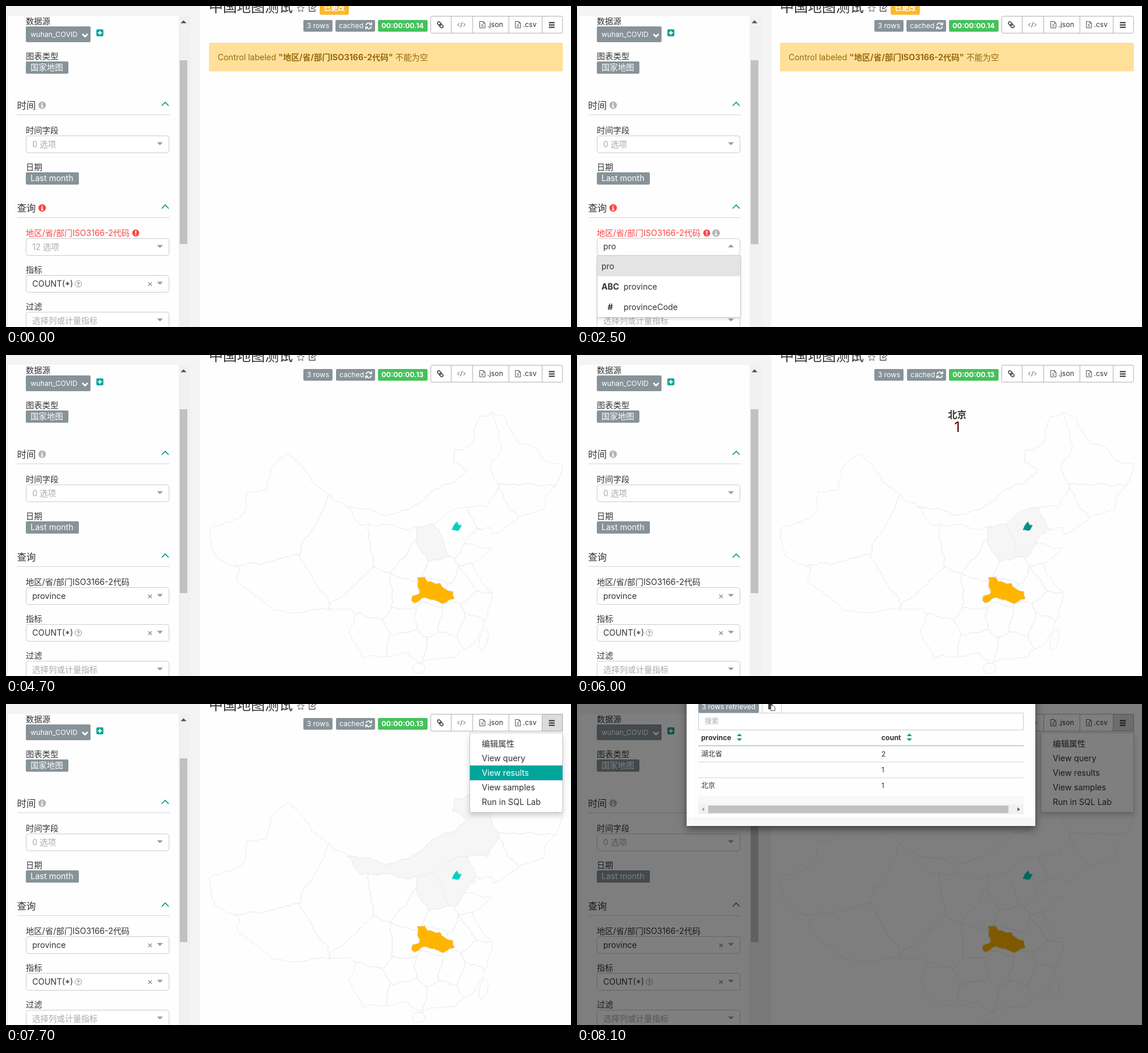
An HTML page for the animation above (8900 ms loop, 969 by 550 pixels).

```html
<!DOCTYPE html>
<html lang="zh-CN">
<head>
<meta charset="utf-8">
<title>中国地图测试</title>
<style>
html, body { margin: 0; width: 100%; height: 100%; overflow: hidden; background: #fefefe; }
svg { display: block; width: 969px; height: 550px; }
text { font: 14px Inter, "Noto Sans CJK SC", "Noto Sans CJK", sans-serif; fill: #333; white-space: pre; }
.s { font-size: 12px; }
.h { font-size: 16px; }
.xl { font-size: 24px; }
.b { font-weight: 700; }
.m { text-anchor: middle; }
.w { fill: #fff; }
.ph { fill: #aaa; }
.red { fill: #fb4545; }
.box { fill: #fff; stroke: #ccc; }
.line { fill: none; stroke: #cfd8e4; }
.ico { fill: none; stroke: #555; }
.land { fill: none; stroke: #e8ecec; stroke-linejoin: round; }
.hover { fill: #f6f6f6; }
.drop { filter: drop-shadow(0 2px 2px rgba(0,0,0,.14)); }
.menu { filter: drop-shadow(0 5px 5px rgba(0,0,0,.18)); }
#dialog { filter: drop-shadow(0 5px 7px rgba(0,0,0,.5)); }
</style>
</head>
<body>
<svg viewBox="0 0 969 550">
  <defs>
    <path id="down" d="M-5-2.5h10L0 2.5z"/>
    <path id="up" d="M-5 2.5h10L0-2.5z"/>
    <path id="fold" d="M-6 3.5 0-2.5 6 3.5" fill="none" stroke="#00968b" stroke-width="1.6"/>
    <path id="cross" d="M-3-3 3 3M3-3-3 3" stroke="#888" stroke-width="1.2"/>
    <g id="info"><circle r="6.5"/><path d="M0-4.2V-2.2M-1.8-.4H0V3.4M-2 3.4H2" stroke="#fff" stroke-width="1.7" fill="none"/></g>
    <g id="warn"><circle r="6"/><path d="M0-4V1M0 2.2V4" stroke="#fff" stroke-width="2"/></g>
    <path id="sort" d="M-4.5-2h9L0-6.5zM-4.5 2h9L0 6.5z" fill="#00a08f"/>
    <path id="file" class="ico" d="M-4.5-5.5H1.5L4.5-2.5V5.5H-4.5zM1.5-5.5V-2.5H4.5M-2 0H2M-2 2.5H2"/>
    <clipPath id="coast"></clipPath>
  </defs>

  <rect width="333" height="550" fill="#f5f4f5"/>
  <rect x="4" y="17" width="312" height="533" fill="#fefefe"/>
  <rect x="296" y="17" width="20" height="533" fill="#f1f1f1"/>
  <rect x="298" y="93" width="13" height="315" fill="#c1c1c1"/>
  <use href="#up" x="304.5" y="27" fill="#505050"/>
  <g id="panel"></g>

  <g id="header"></g>
  <path class="ico" d="M505.500-2l1.800 3.900 4.200.5-3.100 2.900.8 4.200-3.700-2.100-3.700 2.100.8-4.200-3.100-2.900 4.200-.5z"/>
  <path class="ico" d="M527-1H520V9H530V5M524 5l.5-3L531-3.500l2.500 2L527 4.500z" stroke-width="1.3"/>
  <path d="M617.500 33a4.400 4.400 0 0 1 8-2M626.500 35a4.400 4.400 0 0 1-8 2M627 28v4h-4M617 40v-4h4" fill="none" stroke="#fff" stroke-width="1.7"/>
  <g transform="rotate(40 745 32)" class="ico" stroke-width="1.7"><rect x="739" y="29.5" width="7" height="4.5" rx="2.2"/><rect x="744" y="30.5" width="7" height="4.5" rx="2.2"/></g>
  <path class="ico" d="M777.500 29l-3 3 3 3M784.500 29l3 3-3 3M782.500 27.500l-3 9"/>
  <path d="M931 28.500h10M931 32.500h10M931 36.500h10" stroke="#333" stroke-width="2"/>

  <g id="chart"></g>
  <g id="actions" data-on="7000-8900"></g>
  <rect id="shade" width="969" height="550"/>
  <g id="dialog" data-on="7800-8900">
    <rect id="sheet" x="188" y="-40" width="598" rx="1" fill="#fefefe"/>
    <g id="results" data-on="8100-8900"></g>
  </g>
</svg>
<script>
const $ = id => document.getElementById(id);

// Markup helpers; y is the vertical centre of a text line.
const SIZE = { s: 12, h: 16, xl: 24 };
const baseline = (y, cls) => y + .36 * (SIZE[cls.split(' ')[0]] || 14);
const text = (x, y, s, cls = '', attr = '') => `<text x="${x}" y="${baseline(y, cls)}" class="${cls}" ${attr}>${s}</text>`;
const rect = (x, y, w, h, attr) => `<rect x="${x}" y="${y}" width="${w}" height="${h}" ${attr}/>`;
const box = (x, y, w, h, attr = '') => rect(x + .5, y + .5, w - 1, h - 1, 'class="box" ' + attr);
const use = (id, x, y, attr = '') => `<use href="#${id}" x="${x}" y="${y}" ${attr}/>`;
const line = (x1, x2, y, attr = 'class="line"') => `<path d="M${x1} ${y}H${x2}" ${attr}/>`;
const on = (spans, ...parts) => `<g data-on="${spans}">${parts.join('')}</g>`;
const badge = (x, y, w, h, s, cls = '', fill = '#879399') =>
  rect(x, y, w, h, `rx="2" fill="${fill}"`) + text(x + (cls ? 6 : 8), y + h / 2 - (cls ? 0 : 1), s, cls + ' w');
const select = y => box(34, y, 246, 30, 'rx="4"');
const arrow = (y, id = 'down') => use(id, 264, y, 'fill="#999"');
const grey = 'fill="#b3b3b3"', alarm = 'fill="#fb4545"';
const section = (s, y) => text(19, y, s, 'h') + use('fold', 273, y - 2.5) + line(19, 281, y + 16.5);
const caret = x => `<path d="M${x}.5 402V419" stroke="#222"/>`;

function panel() {
  const code = '地区/省/部门ISO3166-2代码';
  const labels = [['时间字段', 213], ['日期', 276], ['指标', 452], ['过滤', 515], ['数据源', 26], ['图表类型', 86]];
  return labels.map(([s, y]) => text(34, y, s)).join('') +
    rect(34, 35, 111, 27, 'rx="2" fill="#879399"') + text(42, 48.500, 'wuhan_COVID', 's w', 'font-weight="500"') +
    '<path d="M131 48l4.500 4.500 4.500-4.500" fill="none" stroke="#fff" stroke-width="2.6"/>' +
    rect(155, 40, 12, 12, 'rx="2" fill="#00a699"') + '<path d="M157.500 46h7M161 42.500v7" stroke="#fff" stroke-width="2"/>' +
    badge(34, 95, 73, 21, '国家地图') + badge(34, 285, 91, 21, 'Last month') +
    section('时间', 170) + use('info', 62, 170, grey) +
    section('查询', 346) + on('0-3200', use('info', 62, 346, alarm)) +
    select(222) + text(45, 237, '0 选项', 'ph') + arrow(236) +
    on('0-3200', text(34, 389, code, 'red'), use('warn', 222.500, 389, alarm)) +
    on('400-3200', use('info', 238.500, 389, grey)) +
    on('3200-8900', text(34, 389, code)) +
    select(398) +
    on('3200-3900', rect(34.500, 398.500, 245, 29, 'rx="4" fill="none" stroke="#000" stroke-opacity=".1" stroke-width="6"'),
      rect(34.500, 398.500, 245, 29, 'rx="4" fill="#fff" stroke="#111"')) +
    on('0-1800', text(45, 413, '12 选项', 'ph')) +
    on('0-900 3200-8900', arrow(412)) + on('900-3200', arrow(411, 'up')) +
    '<text id="query" x="45" y="416.500"></text>' +
    on('900-1400', caret(45)) + on('2000-2500 3000-3200', caret(67)) +
    on('3200-8900', text(45, 413, 'province'), use('cross', 247, 413.500)) +
    on('300-400', use('info', 71, 452, grey)) +
    select(461) + text(45, 476, 'COUNT(*)') + use('cross', 247, 476.500) + arrow(475) +
    '<circle cx="124" cy="476" r="5.5" fill="none" stroke="#999"/>' +
    text(124, 475, '?', 'm b', 'style="font-size:9px;fill:#888"') +
    select(524) + text(45, 539, '选择列或计量指标', 'ph') + arrow(538) +
    '<g id="list" class="drop" data-on="900-3200"></g>';
}

function header() {
  const time = s => badge(638, 24, 85, 20, s, 's b', '#44c25b');
  return text(348, 1.500, '中国地图测试', 'xl') +
    on('0-3200', rect(538, -7, 50, 22, 'rx="3" fill="#fcb72c"'), text(545, 3.500, '已更改', 's b w')) +
    badge(510, 24, 50, 20, '3 rows', 's') +
    on('0-4000', badge(565, 24, 68, 20, 'cached', 's'), time('00:00:00.14')) +
    on('4000-8900', badge(566, 24, 67, 20, 'cached', 's'), time('00:00:00.13')) +
    box(728, 17, 227, 30, 'rx="2" style="stroke:#b3b3b3"') +
    on('6900-8900', rect(919.500, 17.500, 35, 29, 'fill="#dcdcdc" stroke="#a5a5a5"')) +
    '<path d="M763.500 17v30M800.500 17v30M862.500 17v30M919.500 17v30" stroke="#b3b3b3"/>' +
    use('file', 817, 32) + text(825.500, 32, '.json', 's') + use('file', 878, 32) + text(886.500, 32, '.csv', 's');
}

// The outer border starts where the northern steppe begins.
const pairs = s => s.split(', ').map(p => p.split(' ').map(Number));
const land = pairs('585 261, 650 275, 690 265, 722 240, 750 222, 775 212, 790 196, 766 184, 770 163, 790 158, 803 145, 806 122, 813 105, 835 98, ' +
  '855 105, 880 152, 905 158, 925 182, 954 187, 948 215, 922 248, 922 265, 888 274, 868 287, 836 308, 832 296, 797 306, 785 325, 833 331, 800 360, ' +
  '832 405, 828 435, 810 480, 775 515, 712 530, 690 510, 612 520, 587 476, 600 446, 590 433, 545 435, 500 441, 455 434, 398 390, 400 364, 358 345, ' +
  '348 300, 407 272, 412 234, 446 232, 455 193, 484 169, 521 207, 548 235');
const steppe = [...land.slice(0, 14), ...pairs('850 155, 830 195, 845 225, 825 262, 775 262, 735 291, 690 300, 655 290, 610 292')];
const hubei = pairs('705 381, 719 380, 723 388, 745 391, 767 405, 769 418, 749 427, 717 416, 700 426, 695 421, 697 412, 709 408, 706 398');
const beijing = pairs('774 285, 777 291, 782 291, 777 301, 764 300, 769 290');
const seeds = pairs('734 328, 770 316, 450 285, 470 410, 580 345, 640 415, 672 330, 698 350, 745 372, 735 405, 682 415, 682 452, 625 485, ' +
  '690 495, 725 450, 750 503, 765 455, 797 465, 812 432, 782 395, 805 378, 800 338, 845 275, 885 250, 890 190');

const noise = (x, y) => { const v = Math.sin(x * 12.99 + y * 78.23) * 43758.5; return v - Math.floor(v) - .5; };
function rough(a, b) {
  const len = Math.hypot(b[0] - a[0], b[1] - a[1]);
  if (len < 5) return [b];
  const sx = a[0] + b[0], sy = a[1] + b[1], sway = Math.min(len, 24) * .3;
  const mid = [sx / 2 + noise(sx, sy) * sway, sy / 2 + noise(sy, sx) * sway];
  return [...rough(a, mid), ...rough(mid, b)];
}
const next = (pts, i) => pts[(i + 1) % pts.length];
const outline = pts => 'M' + pts.flatMap((p, i) => rough(p, next(pts, i)))
  .map(p => p.map(v => v.toFixed(1)).join(' ')).join('L') + 'Z';

// Province borders: the area nearest to each seed.
const dist = (p, q) => (p[0] - q[0]) ** 2 + (p[1] - q[1]) ** 2;
const clip = (pts, side) => pts.flatMap((p, i) => {
  const q = next(pts, i), a = side(p), b = side(q), k = a / (a - b);
  return [...(a >= 0 ? [p] : []), ...(a * b < 0 ? [p.map((v, n) => v + (q[n] - v) * k)] : [])];
});
const stage = [[300, 50], [969, 50], [969, 560], [300, 560]];
const cell = s => seeds.filter(o => o !== s)
  .reduce((pts, o) => clip(pts, p => dist(p, o) - dist(p, s)), stage).map(p => p.map(Math.round));

const shape = (pts, attr = '') => `<path d="${outline(pts)}" ${attr}/>`;
const fill = c => `style="fill:${c}"`;
function map() {
  const cells = seeds.map(cell), [shanxi, hebei] = cells;
  $('coast').innerHTML = shape(land);
  return '<g class="land"><g clip-path="url(#coast)">' + cells.map(c => shape(c)).join('') +
    on('4600-7800', shape(shanxi, 'class="hover"')) + on('5500-7800', shape(hebei, 'class="hover"')) + '</g>' +
    shape(land) + shape(steppe, fill('#fefefe')) + on('6500-7800', shape(steppe, 'class="hover"')) +
    '<ellipse cx="708" cy="537" rx="11" ry="9"/><ellipse cx="819" cy="488" rx="7" ry="18" transform="rotate(14 819 488)"/>' +
    shape(hubei, fill('#ffb400')) + on('4900-5300', shape(hubei, fill('#b37e00'))) +
    shape(beijing, fill('#00d1c1')) + on('5600-5700 6000-6400', shape(beijing, fill('#009287'))) + '</g>';
}

function chart() {
  const tip = (spans, name, n) => on(spans, text(652, 102, name, 'h b m'), text(652, 123.500, n, 'xl m', fill('#400')));
  const button = c => rect(611, 307, 70, 30, `rx="2" fill="${c}"`);
  return on('0-3200', rect(348, 63, 607, 49, 'rx="2" fill="#ffe09a"'),
      text(363, 88, 'Control labeled <tspan class="b">"地区/省/部门ISO3166-2代码"</tspan> 不能为空', '', fill('#98690c'))) +
    `<g id="run" data-on="3200-3900">${button('#00a699')}${on('3500-3900', button('#00736a'))}${text(622, 322, '运行查询', 's b w')}</g>` +
    on('4000-8900', map()) + tip('4900-5300', '湖北省', 2) + tip('5600-5700 6000-6400', '北京', 1);
}

const actions = ['编辑属性', 'View query', 'View results', 'View samples', 'Run in SQL Lab'];
const drawActions = active => box(795, 49, 160, 137, 'class="menu"').replace('class="box" ', 'fill="#fff" stroke="#ccc" ') +
  actions.map((s, i) => (i === active ? rect(795.500, 55.500 + i * 25, 159, 25, 'fill="#00a699" stroke="#7aa7dc"') : '') +
    text(816, 68 + i * 25, s, i === active ? 'w' : '')).join('');

function results() {
  const rows = [['湖北省', 2], ['', 1], ['北京', 1]];
  return badge(208, -5, 104, 20, '3 rows retrieved', 's') + box(317, -10, 34, 26, 'rx="2"') +
    '<path d="M328-2h7v4h-3v7h-4z" fill="#444"/><path class="ico" d="M332.500 2.500h4l3 3v6h-7z"/>' +
    box(208, 15, 558, 30) + text(219, 30, '搜索', 's ph') +
    text(213, 57.500, 'province', 's b') + use('sort', 278.500, 57) + text(522, 57.500, 'count', 's b') + use('sort', 570, 57) +
    line(208, 766, 71.500, 'stroke="#c4cccc" stroke-width="2"') + line(208, 766, 99.500) + line(208, 766, 126.500) +
    rows.map(([name, n], i) => text(213, 86 + i * 27, name, 's') + text(522, 86 + i * 27, n, 's')).join('') +
    rect(208, 157, 558, 15, 'fill="#f8f8f8"') + rect(188, 194, 598, 15, 'fill="#f8f8f8"') +
    rect(208, 172, 558, 17, 'fill="#f1f1f1"') + rect(225, 174, 515, 13, 'fill="#c1c1c1"') +
    '<path d="M218 177v7l-4-3.500z" fill="#a3a3a3"/><path d="M755.500 177v7l4-3.500z" fill="#505050"/>';
}

const columns = [['#', 'id'], ['ABC', 'date'], ['ABC', 'country'], ['ABC', 'countryCode']];
const found = [['ABC', 'province'], ['#', 'provinceCode']];
function drawList(typed, active) {
  const rows = typed ? [['', typed], ...found] : columns;
  return rect(34.500, 427.500, 246, 35 * rows.length + 1, 'class="box" rx="2"') +
    rect(35, 428 + active * 35, 245, 35, 'fill="#e4e4e4"') +
    rows.map(([type, name], i) => text(57, 446 + i * 35, type, 'm b') + text(type ? 80 : 42, 446 + i * 35, name)).join('') +
    (typed ? '' : rect(263, 428, 17, 122, 'fill="#f1f1f1"') + rect(265, 445, 13, 84, 'fill="#c1c1c1"'));
}

Object.entries({ panel, header, chart, results }).forEach(([id, draw]) => $(id).innerHTML = draw());
const timed = [...document.querySelectorAll('[data-on]')].map(el => ({
  el, spans: el.dataset.on.split(' ').map(s => s.split('-').map(Number))
}));
const clamp = (v, lo, hi) => Math.max(lo, Math.min(hi, v));
const LOOP = 8900, STEP = 100, start = performance.now();
let last = -1;

function render(t) {
  for (const { el, spans } of timed)
    el.style.display = spans.some(([a, b]) => t >= a && t < b) ? '' : 'none';

  const typed = t < 3200 ? 'pro'.slice(0, clamp((t - 1700) / 100, 0, 3)) : '';
  $('query').textContent = typed;
  $('list').innerHTML = drawList(typed, t >= 2800 ? 1 : 0);
  $('run').style.opacity = clamp((t - 3100) / 400, 0, 1);
  $('actions').innerHTML = drawActions(t < 7800 ? Math.min(2, Math.floor((t - 7100) / 100)) : -1);

  const open = clamp((t - 7700) / 400, 0, 1);
  $('shade').style.opacity = Math.min(.5, open * .86);
  $('dialog').style.opacity = Math.min(1, open * 1.4);
  $('sheet').setAttribute('height', open < 1 ? 26 + 60 * open : 249);
}
function tick() {
  const t = Math.floor((performance.now() - start) % LOOP / STEP) * STEP;
  if (t !== last) render(last = t);
  requestAnimationFrame(tick);
}
tick();
</script>
</body>
</html>
```
